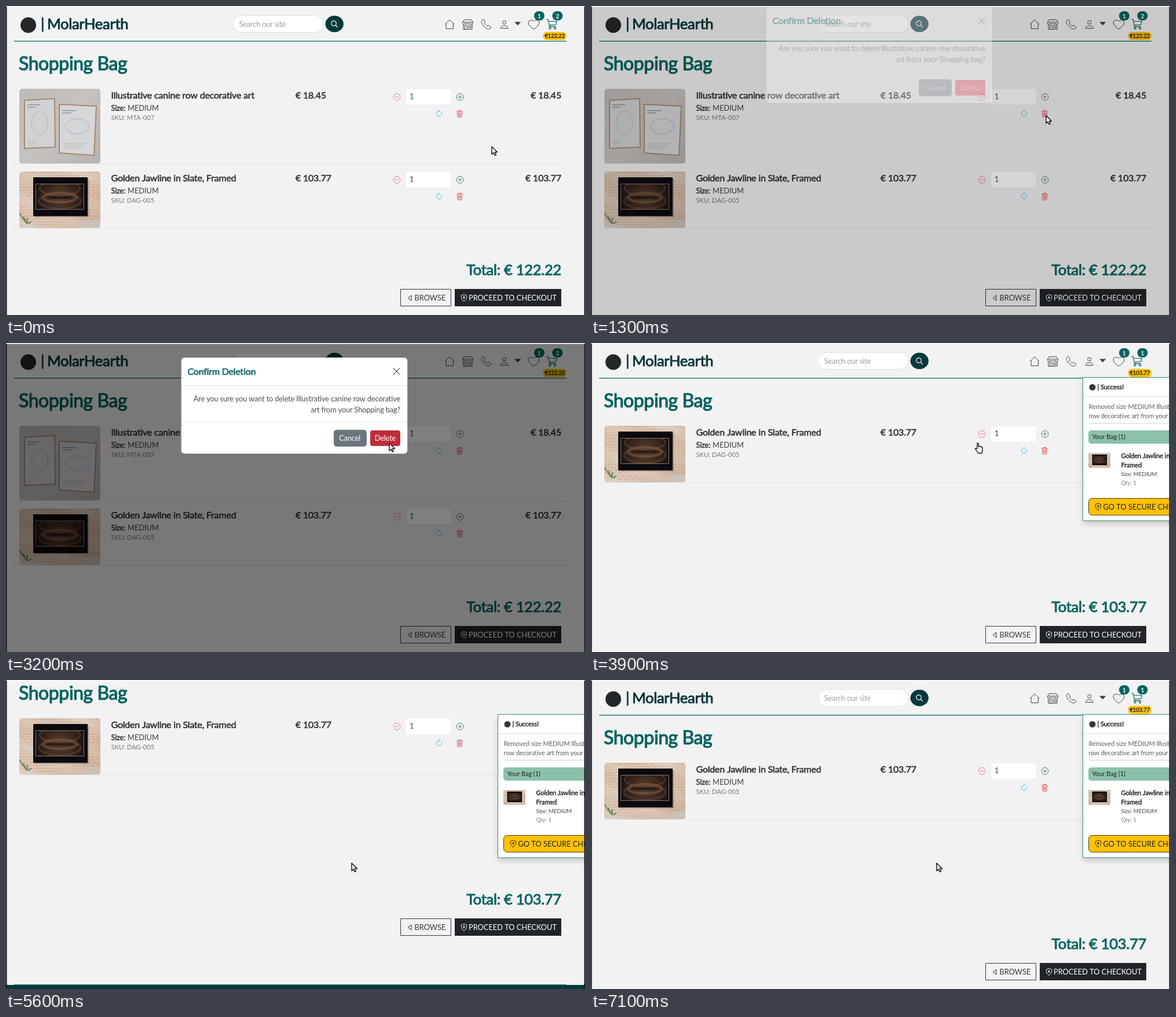
Recreate the animation shown at these times as an HTML page with a canvas. Size 1000 by 534 pixels, loop 7200 ms.

```html
<!DOCTYPE html>
<html lang="en">
<head>
<meta charset="utf-8">
<title>Shopping bag</title>
<style>
  html, body { margin: 0; width: 100%; height: 100%; overflow: hidden; background: #f3f2f3; }
  canvas { display: block; width: 100%; height: 100%; }
</style>
</head>
<body>
<canvas id="stage"></canvas>
<script>
const W = 1000, H = 534, LOOP = 7200, STEP = 100;
const canvas = document.getElementById('stage');
const ctx = canvas.getContext('2d');
const ratio = window.devicePixelRatio || 1;
canvas.width = W * ratio;
canvas.height = H * ratio;

const BRAND = 'MolarHearth';
const POSTER = { name: 'Illustrative canine row decorative art', sku: 'MTA-007', price: '18.45', height: 129.5, photo: posterPhoto };
const PANEL = { name: 'Golden Jawline in Slate, Framed', sku: 'DAG-005', price: '103.77', height: 98, photo: panelPhoto };

const TEAL = '#05645f', DEEP = '#06383c', INK = '#212529', RED = '#dc3545', AMBER = '#ffc107';

// Icons on a 16-unit grid
const ICON = {
  house: 'M1 8 L8 1.2 L15 8 M2.7 6.8 V14.6 H13.3 V6.8',
  shop: 'M2.6 1 H13.4 L15.5 4.6 V6 A1.9 1.9 0 0 1 11.7 6 A1.9 1.9 0 0 1 8 6 A1.9 1.9 0 0 1 4.3 6 A1.9 1.9 0 0 1 .5 6 V4.6 Z M.5 4.6 H15.5 M1.6 8 V15 H14.4 V8 M3.6 15 V9.6 H7 V15 M9.2 9.6 H12.6 V13 H9.2 Z',
  phone: 'M3.7 .9 L1.4 3 C.2 4.5 1.5 7.6 4.4 10.9 C7.6 14.2 11.3 16 13 14.8 L15.2 12.5 L11.6 9.7 L9.3 10.6 C7.6 9.8 6 8.2 5.4 6.7 L6.3 4.4 Z',
  person: 'M5.2 4.8 A2.8 2.8 0 1 1 10.8 4.8 A2.8 2.8 0 1 1 5.2 4.8 M2 14.2 C2 8.6 14 8.6 14 14.2 Z',
  heart: 'M8 14.8 C-7 5 3 -1.6 8 3.2 C13 -1.6 23 5 8 14.8 Z',
  cart: 'M0 1 H2.2 L4.6 11.4 H13.2 M2.9 3.8 H15 L13.6 8.8 L4 9.4 M3.6 13.6 A1.4 1.4 0 1 1 6.4 13.6 A1.4 1.4 0 1 1 3.6 13.6 M11 13.6 A1.4 1.4 0 1 1 13.8 13.6 A1.4 1.4 0 1 1 11 13.6',
  search: 'M1 6.5 A5.5 5.5 0 1 1 12 6.5 A5.5 5.5 0 1 1 1 6.5 M10.6 10.6 L15 15',
  minus: 'M.5 8 A7.5 7.5 0 1 1 15.5 8 A7.5 7.5 0 1 1 .5 8 M4 8 H12',
  plus: 'M.5 8 A7.5 7.5 0 1 1 15.5 8 A7.5 7.5 0 1 1 .5 8 M4 8 H12 M8 4 V12',
  refresh: 'M8 2.2 A5.8 5.8 0 1 0 12.6 4.5 M7.6 .6 L9.6 2.2 L7.6 3.8',
  trash: 'M1.5 3 H14.5 M5.5 3 V1 H10.5 V3 M2.8 3 L3.7 15.2 H12.3 L13.2 3 M5.6 5.2 L6 13 M8 5.2 V13 M10.4 5.2 L10 13',
  shield: 'M8 .8 C6 1.8 4 2.3 2.4 2.7 C1.7 8 3.4 12.4 8 15.2 C12.6 12.4 14.3 8 13.6 2.7 C12 2.3 10 1.8 8 .8 Z M8 6 V10',
  back: 'M11 2.5 V13.5 L4 8 Z',
  close: 'M1 1 L15 15 M15 1 L1 15',
  arrow: 'M0 0 V13.2 L3.1 10.4 L5.2 15.2 L7.5 14.2 L5.4 9.5 H9.5 Z',
  hand: 'M4 11 V2 C4 .5 6.3 .5 6.3 2 V7 C6.5 6 8.5 6 8.6 7.4 C9 6.5 10.8 6.6 10.9 8 C11.4 7.3 13 7.6 13 9 V13 C13 15.5 12 16 11.8 18.5 H5.5 C5.3 16.5 3 14.5 .8 11.6 C0 10.3 1.8 9.3 2.8 10.4 Z'
};
for (const key in ICON) ICON[key] = new Path2D(ICON[key]);

const clamp = v => Math.max(0, Math.min(1, v));
const span = (t, from, to) => clamp((t - from) / (to - from));
const smooth = p => p * p * (3 - 2 * p);
const easeOut = p => 1 - (1 - p) ** 3;
const mix = (a, b, p) => a + (b - a) * p;

// Mixed-case text and prices are set slightly tight, capitals at normal spacing
function text(s, x, y, size, color, { bold = false, align = 'left' } = {}) {
  ctx.font = `400 ${size}px Lato, sans-serif`;
  ctx.letterSpacing = /[a-z€]/.test(s) ? `${-.013 * size}px` : '0px';
  ctx.textAlign = align;
  ctx.fillStyle = color;
  ctx.fillText(s, x, y);
  if (!bold) return;
  ctx.strokeStyle = color;
  ctx.lineWidth = size / 27;
  ctx.lineJoin = 'round';
  ctx.strokeText(s, x, y);
}

function rect(x, y, w, h, fill, r = 0, border = null) {
  ctx.beginPath();
  ctx.roundRect(x, y, w, h, r);
  if (fill) { ctx.fillStyle = fill; ctx.fill(); }
  if (border) { ctx.strokeStyle = border; ctx.lineWidth = 1; ctx.stroke(); }
}

function disc(x, y, rx, fill, ry = rx) {
  ctx.beginPath();
  ctx.ellipse(x, y, rx, ry, 0, 0, 7);
  ctx.fillStyle = fill;
  ctx.fill();
}

function icon(name, x, y, size, color, weight = 1) {
  const k = size / 16;
  ctx.save();
  ctx.translate(x, y);
  ctx.scale(k, k);
  ctx.strokeStyle = color;
  ctx.lineWidth = weight / k;
  ctx.lineJoin = 'round';
  ctx.stroke(ICON[name]);
  ctx.restore();
}

function shield(x, y, size, color) {
  icon('shield', x, y, size, color);
  disc(x + size / 2, y + size * .42, size * .11, color);
}

function quad(points, fill, stroke, weight) {
  ctx.beginPath();
  points.forEach(([x, y]) => ctx.lineTo(x, y));
  ctx.closePath();
  ctx.fillStyle = fill;
  ctx.fill();
  if (!stroke) return;
  ctx.strokeStyle = stroke;
  ctx.lineWidth = weight;
  ctx.stroke();
}

function ring(x, y, rx, ry, color, weight, dash = []) {
  ctx.beginPath();
  ctx.ellipse(x, y, rx, ry, 0, 0, 7);
  ctx.setLineDash(dash);
  ctx.strokeStyle = color;
  ctx.lineWidth = weight;
  ctx.stroke();
  ctx.setLineDash([]);
}

function posterPhoto() {
  const wall = ctx.createLinearGradient(0, 0, 140, 130);
  wall.addColorStop(0, '#bebab8');
  wall.addColorStop(.5, '#c5c1be');
  wall.addColorStop(1, '#b6b2af');
  rect(0, 0, 140, 130, wall);
  quad([[9, 20], [61, 17], [62, 101], [9, 103]], '#d2d2d4', '#a78a70', 2);
  quad([[69, 27], [133, 30], [129, 115], [69, 111]], '#d6d6d9', '#a78a70', 2);
  rect(14, 27, 22, 1.6, '#8894a4');
  rect(14, 31, 14, 1.6, '#8894a4');
  rect(74, 37, 25, 1.6, '#8894a4');
  rect(74, 41, 16, 1.6, '#8894a4');
  ring(35, 59, 14, 20, '#b5bac2', 3, [1.4, 1.6]);
  ring(35, 59, 9, 14, '#bfc3c9', 1, [1, 2]);
  ring(100, 65, 20, 13, '#b0b7c3', 3, [1.4, 1.6]);
  ring(100, 69, 12, 17, '#b5bcc8', 1, [1, 2]);
  for (let i = 0; i < 4; i++) {
    rect(15, 88 + i * 3, 16 - i * 2, .8, '#adb0b5');
    rect(76, 94 + i * 3, 40 - i * 5, .8, '#adb0b5');
  }
}

function panelPhoto() {
  const wall = ctx.createLinearGradient(0, 0, 140, 98);
  wall.addColorStop(0, '#dccbb9');
  wall.addColorStop(.5, '#e2d4c6');
  wall.addColorStop(1, '#d0b9a5');
  rect(0, 0, 140, 98, wall);
  for (let row = 0; row < 20; row++) {
    for (let col = -1; col < 14; col++) {
      const shade = Math.abs(Math.sin(row * 12.9 + col * 78.2));
      rect(col * 11 + (row % 2) * 5.5, row * 5, 10, 4, `rgba(185,135,105,${.06 + shade * .27})`);
    }
  }
  rect(26, 13, 94, 66, 'rgba(80,55,45,.35)');
  rect(24, 10, 94, 67, '#0b0a0e');
  const glow = ctx.createRadialGradient(70, 44, 6, 70, 44, 44);
  glow.addColorStop(0, '#54382a');
  glow.addColorStop(.6, '#33241e');
  glow.addColorStop(1, '#161012');
  rect(28.5, 21.5, 83, 44, glow, 0, '#8b7767');
  ctx.save();
  ctx.beginPath();
  ctx.rect(29, 22, 82, 43);
  ctx.clip();
  ring(70, 29, 35, 12, 'rgba(120,85,60,.4)', 3);
  ring(70, 45, 29, 8, 'rgba(165,118,78,.6)', 4, [2, 1.2]);
  ring(70, 51, 36, 13, 'rgba(110,75,52,.5)', 3);
  disc(70, 45, 22, 'rgba(18,12,12,.6)', 2.5);
  ctx.restore();
  ctx.strokeStyle = '#6e8561';
  ctx.lineWidth = 2;
  ctx.beginPath();
  for (const [x, y] of [[0, 72], [7, 78], [14, 80], [21, 87]]) {
    ctx.moveTo(20, 98);
    ctx.quadraticCurveTo(12, 90, x, y);
  }
  ctx.stroke();
  quad([[13, 90], [25, 93], [25, 98], [10, 98]], '#d5d1c8');
  quad([[112, 84], [140, 83], [140, 98], [109, 98]], '#cbc1b7');
}

function photo(draw, x, y, k, height, r) {
  ctx.save();
  ctx.translate(x, y);
  ctx.scale(k, k);
  ctx.beginPath();
  ctx.roundRect(0, 0, 140, height, r);
  ctx.clip();
  draw();
  ctx.restore();
}

function pill(x, y, w, h, fill, label, color) {
  rect(x, y, w, h, fill, h / 2);
  text(label, x + w / 2, y + h / 2 + 3.5, 9.6, color, { bold: true, align: 'center' });
}

function header(count, total) {
  disc(38.5, 33, 13.5, '#24282b');
  text('|', 60, 40, 25.6, DEEP, { bold: true });
  text(BRAND, 71, 40, 25.6, DEEP, { bold: true });

  rect(392.5, 16.5, 156, 29, '#fff', 14.5, '#dfe1e6');
  text('Search our site', 402.5, 35.5, 12.8, '#9a9da2');
  disc(567.3, 31, 15.7, DEEP, 14.3);
  icon('search', 561, 25, 12.5, '#fff', 1.2);

  const gray = '#3d4144';
  icon('house', 757, 22.5, 18.5, gray);
  icon('shop', 788, 22.5, 19, gray);
  icon('phone', 820, 22, 19, gray);
  icon('person', 852, 23, 17.5, gray);
  quad([[878, 27.5], [889.5, 27.5], [883.7, 33.5]], gray);
  icon('heart', 902, 22.5, 19, gray);
  icon('cart', 933.5, 22, 19, TEAL, 1.2);
  pill(912, 9, 18, 16, TEAL, '1', '#fff');
  pill(943.5, 9, 18, 16, TEAL, count, '#fff');
  pill(927.3, 44.8, 41, 14, AMBER, '€' + total, INK);
  rect(14, 60, 954, 1.5, '#24806f');
}

function bagRow(item, y, hover) {
  const base = y + 17;
  photo(item.photo, 23, y, 1, item.height, 5);
  text(item.name, 181.5, base, 16, '#303338', { bold: true });
  text('Size:', 181.5, y + 37.5, 12.8, '#303338', { bold: true });
  text('MEDIUM', 210, y + 37.5, 12.8, '#3c4045');
  text('SKU: ' + item.sku, 181.5, y + 53.5, 11.2, '#75797e');
  text('€ ' + item.price, 500, base, 16, '#303338', { bold: true });
  text('€ ' + item.price, 959, base, 16, '#303338', { bold: true, align: 'right' });

  icon('minus', 668.7, y + 8, 12.6, '#e0727d', .9);
  rect(690, y, 79, 28, '#fff', 2, '#ebebee');
  text('1', 697, y + 18, 12.8, '#3c4045');
  icon('plus', 777.7, y + 8, 12.6, '#3d7465', .9);
  icon('refresh', 741.8, y + 36.7, 12.6, '#35c3e2', .95);
  if (hover) rect(767.5, y + 28.5, 32, 29, null, 5, RED);
  icon('trash', 777, y + 36.7, 13, '#dd5560');
  rect(14, y + item.height - .5, 954, 1, '#e3e2e4');
}

function page(items, total, hover) {
  rect(0, 0, W, 603, '#f3f2f3');
  header(String(items.length), total);
  text('Shopping Bag', 22, 111, 32, TEAL, { bold: true });
  let y = 143;
  for (const item of items) {
    bagRow(item, y, hover && y === 143);
    y += Math.round(item.height + 13);
  }
  text('Total: € ' + total, 959, 465, 25.6, TEAL, { bold: true, align: 'right' });

  rect(681.5, 489.5, 87, 29, null, 0, '#34383c');
  icon('back', 691, 498, 13, INK);
  text('BROWSE', 705.5, 509, 12.8, '#34383c');
  rect(775, 489, 184, 30, INK);
  shield(784.5, 498, 13, '#fff');
  text('PROCEED TO CHECKOUT', 799, 509, 12.8, '#fff');

  rect(0, 604, W, 120, DEEP);
  rect(14, 603, 954, 1.2, '#24806f');
}

function modal(shade, rise, hover) {
  rect(0, 1.5, W, H, `rgba(0,0,0,${shade * .5})`);
  ctx.save();
  ctx.globalAlpha = shade;
  ctx.translate(0, -40 * (1 - rise));
  rect(302.5, 25, 391, 166.5, '#fff', 6, 'rgba(0,0,0,.18)');
  text('Confirm Deletion', 313.5, 54.5, 16, TEAL, { bold: true });
  icon('close', 668, 42.5, 13, '#767676', 1.5);
  rect(303, 73, 390, 1, '#e3e5e8');
  text(`Are you sure you want to delete ${POSTER.name.replace(/ art$/, '')}`, 681, 101, 12.8, '#4a4d51', { align: 'right' });
  text('art from your Shopping bag?', 681, 119.7, 12.8, '#4a4d51', { align: 'right' });
  rect(303, 136, 390, 1, '#e3e5e8');
  rect(566, 150, 57, 29, '#6c757d', 5);
  text('Cancel', 575.3, 169, 12.8, '#fff');
  rect(629, 151, 52, 27, hover ? '#bf2d3c' : RED, 4);
  text('Delete', 636.7, 169, 12.8, '#fff');
  ctx.restore();
}

function toast(alpha) {
  ctx.save();
  ctx.globalAlpha = alpha;
  ctx.shadowColor = 'rgba(0,0,0,.2)';
  ctx.shadowBlur = 10 * ratio;
  ctx.shadowOffsetY = 5 * ratio;
  rect(849.5, 59.5, 180, 247.5, '#fff');
  ctx.shadowColor = 'transparent';
  rect(849.5, 59.5, 180, 247.5, null, 0, '#2f9475');
  disc(866, 76.5, 5.5, '#34383c');
  text('| Success!', 874.5, 80, 11.2, INK, { bold: true });
  rect(850, 92, 150, 1, '#d9dcde');
  text('Removed size MEDIUM ' + POSTER.name.slice(0, 12), 859.5, 114.3, 11.2, '#5a5e63');
  text(POSTER.name.slice(20) + ' from your', 859.5, 130.3, 11.2, '#5a5e63');
  rect(860, 138, 140, 1, '#cfd1d3');
  rect(859, 151, 160, 23, '#8dc1aa', 5);
  text('Your Bag (1)', 865.5, 166, 11.2, INK);
  photo(panelPhoto, 859, 190, 38 / 140, 95, 0);
  const [first, last] = PANEL.name.split(', ');
  text(first, 915.5, 198.7, 11.2, INK, { bold: true });
  text(last, 915.5, 215, 11.2, INK, { bold: true });
  text('Size: MEDIUM', 915.5, 230, 9.8, '#44484c');
  text('Qty: 1', 915.5, 244.5, 9.8, '#777b80');
  rect(859.5, 268.5, 160, 29, AMBER, 6, '#4a3e16');
  shield(869.5, 276.5, 13, INK);
  text('GO TO SECURE CHECKOUT', 884.5, 287.5, 12.8, INK);
  ctx.restore();
}

function pointer(name, x, y) {
  ctx.save();
  ctx.translate(x, y);
  ctx.lineJoin = 'round';
  ctx.lineWidth = 1.4;
  ctx.fillStyle = '#fff';
  ctx.strokeStyle = '#111';
  ctx.fill(ICON[name]);
  ctx.stroke(ICON[name]);
  ctx.restore();
}

// Each move: start time, end time, destination
const START = [839, 243];
const MOVES = [[0, 900, 786, 189.5], [1600, 2500, 662, 173], [3900, 4200, 597, 316.5]];

function cursorAt(t) {
  let [x, y] = START;
  for (const [from, to, tx, ty] of MOVES) {
    const p = smooth(span(t, from, to));
    x = mix(x, tx, p);
    y = mix(y, ty, p);
  }
  return [x, y];
}

function scrollAt(t) {
  return Math.round(77 * (easeOut(span(t, 4800, 5400)) - smooth(span(t, 5600, 6100))));
}

function draw(t) {
  const [x, y] = cursorAt(t);
  const removed = t >= 3400;
  const asking = t >= 1300 && !removed;
  const overTrash = x > 767 && x < 800 && y > 171 && y < 201;
  const overDelete = x > 629 && x < 681 && y > 151 && y < 178;

  ctx.setTransform(ratio, 0, 0, ratio, 0, 0);
  ctx.save();
  ctx.translate(0, -scrollAt(t));
  if (removed) page([PANEL], '103.77', false);
  else page([POSTER, PANEL], '122.22', overTrash && !asking);
  ctx.restore();

  if (asking) modal(span(t, 1250, 1400), easeOut(span(t, 1250, 1550)), overDelete);
  if (t >= 3600) toast(span(t, 3500, 3700));

  rect(0, 0, W, 1.2, '#fdfdfd');
  rect(0, 1, 1.5, H, '#15161a');
  rect(998.6, 1, 1.4, H, '#15161a');

  if (removed && t < 4000) pointer('hand', x + 1, y - 1);
  else pointer('arrow', x, y);
}

function tick(now) {
  draw(Math.floor((now % LOOP) / STEP) * STEP);
  requestAnimationFrame(tick);
}
requestAnimationFrame(tick);
</script>
</body>
</html>
```
